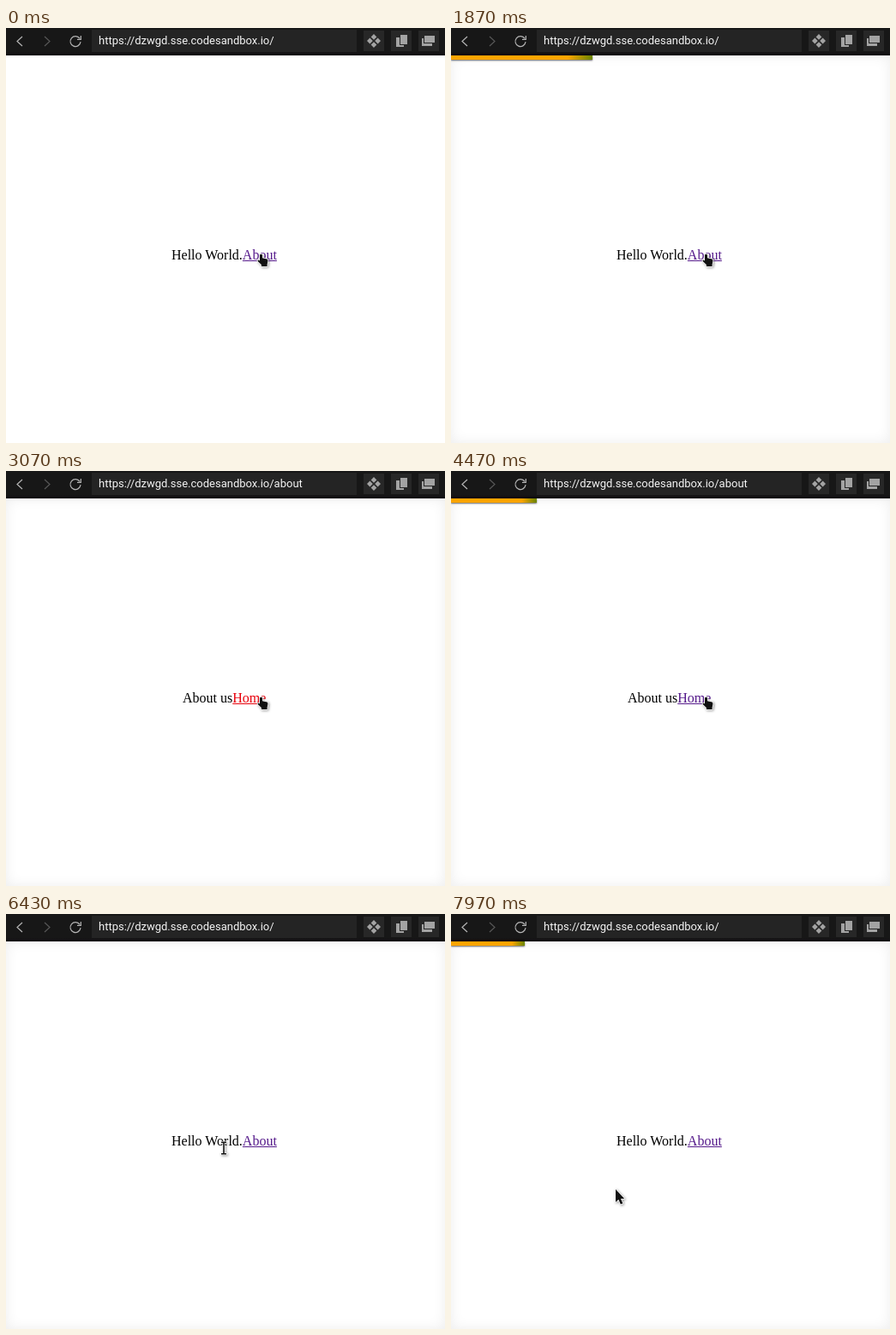
Write an HTML page that moves like this. It is 512 by 484 pixels and loops after 8 s.

```html
<!DOCTYPE html>
<html lang="en">
<head>
<meta charset="utf-8">
<title>Page loading bar</title>
<style>
  html, body { margin: 0; width: 100%; height: 100%; overflow: hidden; background: #fff; }
  #stage { position: relative; width: 512px; height: 484px; overflow: hidden; }
  #stage * { animation-duration: 8s; animation-iteration-count: infinite; animation-timing-function: linear; }
  #stage .step { animation-timing-function: step-end; }

  /* browser chrome */
  header { position: absolute; inset: 0 0 auto; height: 32px; background: linear-gradient(#171717 0 28px, #0d090e 31px); }
  header svg { position: absolute; inset: 0; }
  .url { position: absolute; left: 100px; top: 2px; width: 309px; height: 26px; background: #242424; }
  .url span { position: absolute; left: 8px; top: 0; font: 13px/26px Roboto, sans-serif; color: #f4f4f4; white-space: pre; }

  /* page */
  main { position: absolute; inset: 32px 0 0; overflow: hidden; }
  .edge { position: absolute; inset: 0; box-shadow: inset 0 0 15px rgba(0, 0, 0, .075); animation-name: edge; }
  p { position: absolute; top: 224px; margin: 0; font: 16px/18px "Liberation Serif", serif; color: #000; white-space: pre; }
  p span { color: #551a8b; text-decoration: underline; }
  .home { left: 193px; }
  .about { left: 206px; }
  .on-home { animation-name: on-home; }
  .on-about { animation-name: on-about; }
  .to-about { animation-name: to-about; }
  .to-home { animation-name: to-home; }
  .bar {
    position: absolute; left: 0; top: 0; height: 5px;
    background: linear-gradient(90deg, #ffa500 82%, #6a8500);
    box-shadow: 0 1px 2px rgba(0, 0, 0, .6);
    animation-name: bar;
  }

  /* pointer */
  .pointer { position: absolute; left: 0; top: 0; width: 1px; height: 1px; overflow: visible; animation-name: move;
    filter: drop-shadow(1px 1px 1.5px rgba(0, 0, 0, .4)); }
  .pointer path { fill: #111; stroke: #fff; stroke-width: 1.6; paint-order: stroke; stroke-linejoin: round; }
  .hand { animation-name: hand; }
  .arrow { animation-name: arrow; }
  .beam { animation-name: beam; }

  @keyframes edge { 0%, .87% { opacity: 0 } .875%, 100% { opacity: 1 } }
  @keyframes on-home {
    0% { visibility: visible } 23.75% { visibility: hidden } 64.95%, 100% { visibility: visible }
  }
  @keyframes on-about {
    0% { visibility: hidden } 23.75% { visibility: visible } 64.95%, 100% { visibility: hidden }
  }
  @keyframes to-about {
    0% { color: #551a8b } .875% { color: #e8000b } 1.7% { color: #a00d4b } 2.125% { color: #551a8b }
    83.5% { color: #e8000b } 84.3% { color: #a00d4b } 84.75%, 100% { color: #551a8b }
  }
  @keyframes to-home {
    0% { color: #551a8b } 38.375% { color: #e8000b } 39.125% { color: #a00d4b } 39.625%, 100% { color: #551a8b }
  }
  @keyframes bar {
    0%, 2.37% { width: 0; opacity: 0 }
    2.375% { width: 0; opacity: 1 }
    10.875% { width: 66px }
    20.875% { width: 155px }
    22.125% { width: 157px }
    23.75% { width: 167px; opacity: 1 }
    28.875% { width: 312px; opacity: .58 }
    34% { width: 512px; opacity: 0 }
    34.01%, 43.37% { width: 0; opacity: 0 }
    43.375% { width: 0; opacity: 1 }
    53.375% { width: 78px }
    55.875% { width: 100px }
    63.75% { width: 168px }
    64.95% { width: 170px; opacity: 1 }
    70.08% { width: 313px; opacity: .58 }
    75.2% { width: 512px; opacity: 0 }
    75.21%, 88.49% { width: 0; opacity: 0 }
    88.5% { width: 0; opacity: 1 }
    90.375% { width: 17px }
    99.625% { width: 86px }
    100% { width: 89px; opacity: 1 }
  }
  @keyframes move {
    0%, 65.375% { transform: translate(297px, 264px) }
    70% { transform: translate(270px, 296px) }
    72%, 74.5% { transform: translate(269px, 301px) }
    77.875%, 80.37% { transform: translate(251px, 274px) }
    80.375%, 81% { transform: translate(254px, 273px) }
    82.5%, 85.6% { transform: translate(290px, 265px) }
    90%, 100% { transform: translate(192px, 321px) }
  }
  @keyframes hand {
    0% { visibility: visible } 66.8% { visibility: hidden }
    81.9% { visibility: visible } 86.3%, 100% { visibility: hidden }
  }
  @keyframes arrow {
    0% { visibility: hidden } 66.8% { visibility: visible }
    80.375% { visibility: hidden } 86.3%, 100% { visibility: visible }
  }
  @keyframes beam {
    0% { visibility: hidden } 80.375% { visibility: visible } 81.9%, 100% { visibility: hidden }
  }
</style>
</head>
<body>
<div id="stage">
  <main>
    <p class="home step on-home">Hello World.<span class="step to-about">About</span></p>
    <p class="about step on-about">About us<span class="step to-home">Home</span></p>
    <div class="edge"></div>
    <div class="bar"></div>
  </main>

  <header>
    <div class="url">
      <span class="step on-home">https://dzwgd.sse.codesandbox.io/</span>
      <span class="step on-about">https://dzwgd.sse.codesandbox.io/about</span>
    </div>
    <svg width="512" height="32" fill="none">
      <path d="M19 10l-6 5.5 6 5.5" stroke="#b4b4b4" stroke-width="1.2"/>
      <path d="M45 10l6 5.5-6 5.5" stroke="#575757" stroke-width="1.2"/>
      <path d="M86 12.2A6 6 0 1 0 87 16M87.3 9v4.3H83" stroke="#b4b4b4" stroke-width="1.2"/>
      <path d="M417 3h24v24h-24zM449 3h24v24h-24zM481 3h24v24h-24z" fill="#272727"/>
      <path d="M429 7l3.4 3.4-3.4 3.4-3.4-3.4zM429 16.2l3.4 3.4-3.4 3.4-3.4-3.4zM424.4 11.6l3.4 3.4-3.4 3.4-3.4-3.4zM433.6 11.6l3.4 3.4-3.4 3.4-3.4-3.4z" fill="#a3a3a3"/>
      <path d="M460 8h8v11h-8zM455 11h4v9h5v2h-9z" fill="#a3a3a3"/>
      <path d="M488 9h12v8h-12zM485 12h2v6h10v3h-12z" fill="#a3a3a3"/>
    </svg>
  </header>

  <svg class="pointer">
    <path class="hand step" d="M-1 1.2Q-1-.2 .5-.2T2 1.2V4.2L7.5 5.6Q8.6 6 8.4 8L7.6 12V14H.8V12L-3.4 8Q-3.9 6.6-2.4 6.6L-1 7.6Z"/>
    <path class="arrow step" d="M0 0V15L3.4 12 5.8 17.6 8.4 16.5 6 11H10.2Z"/>
    <path class="beam step" d="M-3-7.5H3V-6H.8V6H3V7.5H-3V6H-.8V-6H-3Z"/>
  </svg>
</div>
</body>
</html>
```
